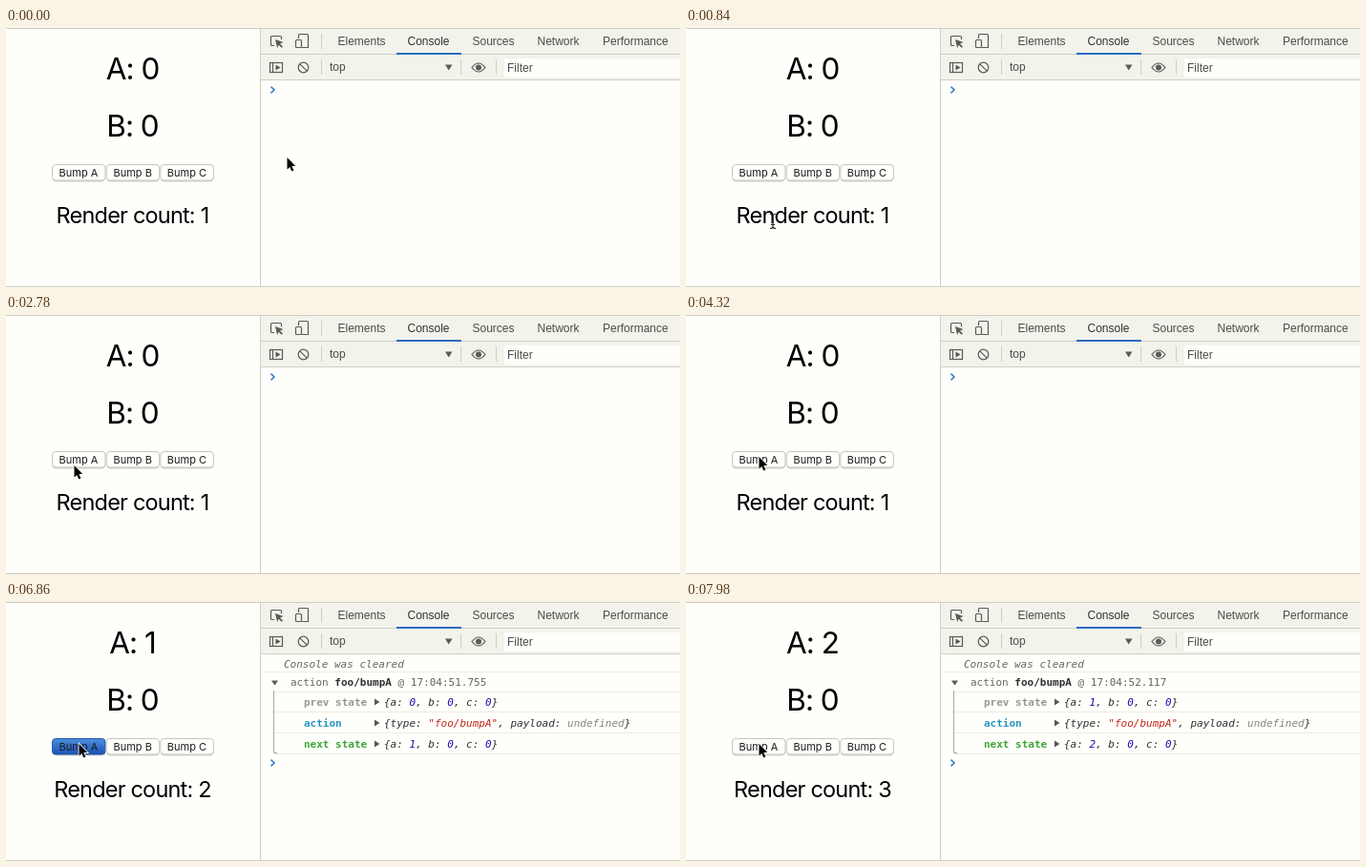
An HTML page for the animation above (8 s loop, 706 by 272 pixels).

```html
<!DOCTYPE html>
<html lang="en">
<head>
<meta charset="utf-8">
<title>Bump counter and console</title>
<style>
html, body { margin: 0; width: 100%; height: 100%; overflow: hidden; background: #fefefb; }
svg { display: block; }
text { white-space: pre; }
.page { font-family: Inter, sans-serif; text-anchor: middle; fill: #000; }
.big { font-size: 31.5px; letter-spacing: -1px; }
.count { font-size: 23.5px; letter-spacing: -.8px; }
.btn { font: 11px Inter, sans-serif; text-anchor: middle; fill: #1c1c1c; }
.ui { font: 12px "Liberation Sans", Arial, sans-serif; fill: #4c4c48; }
.ui .active { fill: #303030; }
.log { font: 11px "DejaVu Sans Mono", monospace; fill: #303030; }
.log .dim { fill: #666660; }
.b { font-weight: bold; }
.i { font-style: italic; }
.n { fill: #1c10b0; }
.s { fill: #c02a18; }
.u { fill: #85857c; }
.line { fill: #cecec4; }
.row { fill: #ededE4; }
.icon { fill: none; stroke: #5a5a56; stroke-width: 1.2; }
.solid { fill: #5a5a56; stroke: none; }
</style>
</head>
<body>
<svg width="706" height="272" viewBox="0 0 706 272">
  <defs>
    <linearGradient id="blue" x2="0" y2="1">
      <stop stop-color="#4a8fdd"/><stop offset="1" stop-color="#1c52b4"/>
    </linearGradient>
  </defs>

  <g class="page">
    <text id="a" class="big" x="132.500" y="53.500"></text>
    <text class="big" x="132.500" y="113.500">B: 0</text>
    <text id="count" class="count" x="132.500" y="204.500"></text>
  </g>
  <g id="buttons"></g>

  <rect x="267" width="439" height="54" fill="#f3f3ec"/>
  <rect x="522" y="32" width="184" height="20" fill="#fefefb"/>
  <g class="line">
    <rect width="706" height="1"/>
    <rect y="271" width="706" height="1"/>
    <rect x="266" width="1" height="272"/>
    <rect x="267" y="27" width="439" height="1"/>
    <rect x="267" y="54" width="439" height="1"/>
    <rect x="330" y="6" width="1" height="16"/>
    <rect x="330" y="33" width="1" height="16"/>
    <rect x="476" y="33" width="1" height="16"/>
    <rect x="513" y="33" width="1" height="16"/>
  </g>
  <rect x="409" y="26" width="68" height="2" fill="#2c6cc0"/>

  <g class="icon">
    <path d="M281 18.500H278.500Q277.500 18.500 277.500 17.500V9.500Q277.500 8.500 278.500 8.500H287.500Q288.500 8.500 288.500 9.500V12"/>
    <path class="solid" d="M282 12l8.500 3-3.500 1.500 3 3-1.300 1.300-3-3-1.500 3.200z"/>
    <path d="M306.500 11V7.500Q306.500 6.500 307.500 6.500H315.500Q316.500 6.500 316.500 7.500V20.500H310"/>
    <rect x="303.500" y="12.500" width="6" height="8" rx="1"/>
    <rect x="276.500" y="36.500" width="13" height="10"/>
    <path d="M279.500 36V47"/>
    <path class="solid" d="M282.500 38.500l5 3-5 3z"/>
    <circle cx="311.500" cy="41.500" r="5.300"/>
    <path d="M307.800 37.800l7.400 7.400"/>
    <path d="M488 41.500Q495 32.500 502 41.500Q495 50.500 488 41.500Z"/>
    <circle class="solid" cx="495" cy="41.500" r="3"/>
    <path class="solid" d="M460 38.500h7.500l-3.750 6z"/>
  </g>
  <g class="ui">
    <text x="347.500" y="18">Elements</text>
    <text class="active" x="420.500" y="18">Console</text>
    <text x="488.500" y="18">Sources</text>
    <text x="556.500" y="18">Network</text>
    <text x="625" y="18">Performance</text>
    <text x="339" y="45">top</text>
    <text x="525" y="46">Filter</text>
  </g>

  <g class="log">
    <g id="cleared">
      <text class="i dim" x="291" y="69">Console was cleared</text>
      <rect class="row" x="267" y="73" width="439" height="1"/>
    </g>
    <g id="entry">
      <path class="solid" d="M278 82.500h7l-3.500 5z"/>
      <text x="298" y="88"><tspan class="dim">action </tspan><tspan class="b">foo/bumpA</tspan><tspan id="stamp" class="dim"></tspan></text>
      <path d="M280.500 93V158.500H284" fill="none" stroke="#a8a8a0"/>
      <g id="rows"></g>
    </g>
  </g>
  <path id="prompt" d="M277.500 -3.300l3.500 3.300-3.500 3.300" fill="none" stroke="#3a80c8" stroke-width="1.600"/>

  <path id="arrow" d="M.5 0V12.500L3.300 9.900L5.300 14.500L7.400 13.600L5.400 9.100H9.300Z" fill="#000" stroke="#fff" stroke-width="1.600" paint-order="stroke"/>
  <path id="beam" d="M-3 -7.500Q0 -7.500 0 -5.500Q0 -7.500 3 -7.500M0 -6V6M-3 7.500Q0 7.500 0 5.500Q0 7.500 3 7.500M-2 3.500H2" fill="none" stroke="#222" stroke-width="1.100"/>
</svg>

<script>
const $ = id => document.getElementById(id);
const LOOP = 8000;
const PRESS = [[5320, 5900], [6760, 7200]];
const LOG_DELAY = 100;

// time, x, y of the pointer
const PATH = [
  [0, 294, 136], [100, 268, 160], [250, 205, 210], [400, 167, 230],
  [600, 124, 224], [820, 92, 204], [1140, 81, 191], [1930, 81, 191],
  [1940, 82, 186], [2300, 76, 174], [2680, 71, 158], [3940, 70, 157],
  [4320, 76, 149]
];
const BEAM = [740, 2200];

$('buttons').innerHTML = ['A', 'B', 'C'].map((name, i) => {
  const x = 48.5 + i * 56.7;
  return `<rect x="${x}" y="144" width="55.500" height="17.500" rx="4" fill="#d4d4cc"/>
    <rect id="btn${name}" x="${x}" y="143.500" width="55.500" height="16.500" rx="3.500" fill="#fefefb" stroke="#c6c6bc"/>
    <text class="btn" x="${x + 27.5}" y="156">Bump ${name}</text>`;
}).join('');

const span = (cls, text) => `<tspan class="${cls}">${text}</tspan>`;
const state = a => `{a: ${span('n', a)}, b: ${span('n', 0)}, c: ${span('n', 0)}}`;
const action = `{type: ${span('s', '"foo/bumpA"')}, payload: ${span('u', 'undefined')}}`;

function logRow(y, label, color, body) {
  return `<text class="b" x="312" y="${y}" fill="${color}">${label}</text>
    <path class="solid" d="M386 ${y - 7.5}l5.500 3.500-5.500 3.500z"/>
    <text class="i" x="396" y="${y}">${body}</text>
    <rect class="row" x="281" y="${y + 6}" width="425" height="1"/>`;
}

let shown;
function showCount(n) {
  if (shown === n) return;
  shown = n;
  $('a').textContent = 'A: ' + n;
  $('count').textContent = 'Render count: ' + (n + 1);
  $('stamp').textContent = ' @ 17:04:' + (n < 2 ? '51.755' : '52.117');
  $('rows').innerHTML = '<rect class="row" x="281" y="94" width="425" height="1"/>' +
    logRow(109, 'prev state', '#98988c', state(n - 1)) +
    logRow(131, 'action', '#2b96c0', action) +
    logRow(153, 'next state', '#3ca536', state(n));
}

function pointer(t) {
  const i = PATH.findIndex(p => p[0] > t);
  if (i < 0) return PATH[PATH.length - 1].slice(1);
  const [t0, x0, y0] = PATH[i - 1], [t1, x1, y1] = PATH[i];
  const k = (t - t0) / (t1 - t0);
  return [x0 + (x1 - x0) * k, y0 + (y1 - y0) * k];
}

const show = (id, on) => $(id).setAttribute('visibility', on ? 'visible' : 'hidden');

function draw(now) {
  const t = now % LOOP;
  const bumps = PRESS.filter(p => t >= p[1]).length;
  const logged = bumps > 0 && t >= PRESS[bumps - 1][1] + LOG_DELAY;
  const pressed = PRESS.some(([down, up]) => t >= down && t < up);
  showCount(bumps);
  show('cleared', bumps > 0);
  show('entry', logged);
  $('prompt').setAttribute('transform', `translate(0 ${logged ? 169 : bumps ? 84 : 65})`);
  $('btnA').setAttribute('fill', pressed ? 'url(#blue)' : '#fefefb');
  $('btnA').setAttribute('stroke', pressed ? '#2458a8' : '#c6c6bc');

  const beam = t >= BEAM[0] && t < BEAM[1];
  const move = `translate(${pointer(t).map(Math.round).join(' ')})`;
  show('arrow', !beam);
  show('beam', beam);
  $('arrow').setAttribute('transform', move);
  $('beam').setAttribute('transform', move);
  requestAnimationFrame(draw);
}
draw(0);
</script>
</body>
</html>
```
